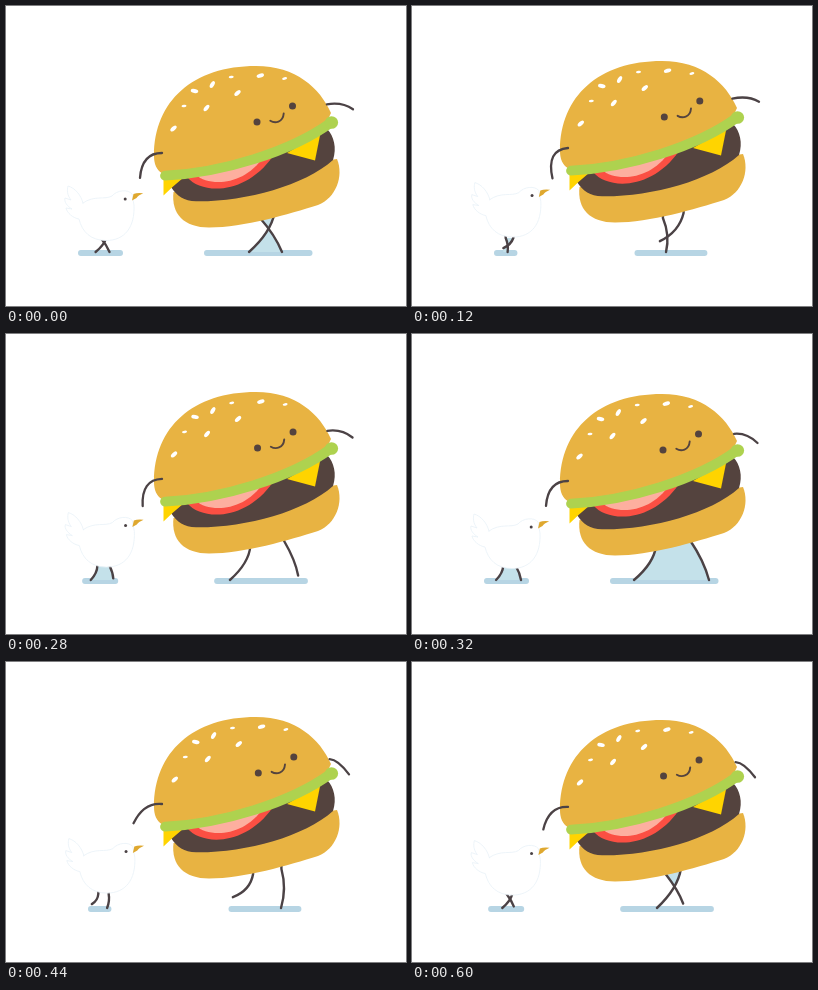
Write an HTML page with a canvas that moves like this. It is 400 px wide and 300 px high and loops after 0.64 s.

```html
<!DOCTYPE html>
<html lang="en">
<head>
<meta charset="utf-8">
<title>Burger and bird walking</title>
<style>
  html, body { margin: 0; width: 100%; height: 100%; overflow: hidden; background: #fff; }
  canvas { display: block; width: 400px; height: 300px; }
</style>
</head>
<body>
<canvas id="stage"></canvas>
<script>
const LOOP = 640, STEP = 40, GROUND = 246;
const BUN = '#e8b342', DARK = '#54433e', LINE = '#4b4245', GREEN = '#aed24f',
      CHEESE = '#ffd400', RED = '#fb4f43', PINK = '#fdaf9f',
      SHADOW = '#b7d5e4', TINT = '#c4e1ea';
const { sin, cos, abs, max, min, PI } = Math;

const canvas = document.getElementById('stage');
const ctx = canvas.getContext('2d');
const dpr = window.devicePixelRatio || 1;
canvas.width = 400 * dpr;
canvas.height = 300 * dpr;

// x, y, tilt; flat seeds are the small ones
const seeds = [
  [167.5, 122.5, -42], [178, 100, -8], [188.5, 85, 12],
  [206.3, 78.5, -60], [225.2, 71, -8], [200.5, 102, -50],
  [231.5, 87, -42], [254.3, 69.7, -18], [278.6, 72.5, -10]
];

const angle = t => 2 * PI * t / LOOP;

function fill(d, color) {
  ctx.fillStyle = color;
  ctx.fill(new Path2D(d));
}

function stroke(d, color, width) {
  ctx.strokeStyle = color;
  ctx.lineWidth = width;
  ctx.stroke(new Path2D(d));
}

function oval(x, y, rx, ry, color, tilt = 0) {
  ctx.beginPath();
  ctx.ellipse(x, y, rx, ry, tilt * PI / 180, 0, 7);
  ctx.fillStyle = color;
  ctx.fill();
}

function shadow(x1, x2) {
  ctx.beginPath();
  ctx.roundRect(x1, 244, x2 - x1, 5.9, 2.9);
  ctx.fillStyle = SHADOW;
  ctx.fill();
}

function shifted(x, y, draw) {
  ctx.save();
  ctx.translate(x, y);
  draw();
  ctx.restore();
}

// One leg of the walk cycle; the foot lifts during the second half turn
function makeLeg(a, hipX, hipY, footX, scale) {
  const raise = max(0, -sin(a));
  const hip = [hipX + 5 * scale * cos(a), hipY];
  const foot = [
    footX + scale * (27 * cos(a) + 5 * cos(2 * a) + 3.5 * sin(a)),
    GROUND - 11.7 * scale * raise
  ];
  const knee = [
    (hip[0] + foot[0]) / 2 + scale * (6.5 - 2.5 * cos(a)),
    (hip[1] + foot[1]) / 2 + scale * 5 * raise
  ];
  return { hip, knee, foot };
}

function drawLegs(a, b, floor) {
  if (floor) {
    ctx.save();
    ctx.beginPath();
    ctx.rect(0, 0, 400, floor);
    ctx.clip();
    fill(`M${a.hip}Q${a.knee} ${a.foot}V${GROUND}H${b.foot[0]}` +
      `L${b.foot}Q${b.knee} ${b.hip}Z`, TINT);
    ctx.restore();
  }
  for (const { hip, knee, foot } of [a, b]) {
    stroke(`M${hip[0]} ${hip[1] - 4}L${hip}Q${knee} ${foot}`, LINE, 2.4);
  }
}

function drawBird() {
  const body = 'M77 197C88 189 99 194 106 190C111 184 122 183 126 188L128 199' +
    'C129 221 119 234.5 100 234.5C85 234.5 76 226 73 213' +
    'C67 212 61 207 60 202L66 203C61 200 58 196 59 192L65 194' +
    'C61 189 61 184 62 180C69 182 75 189 77 197Z';
  fill(body, '#fff');
  stroke(body, '#e9f2f8', 0.8);
  oval(119.2, 193, 1.5, 1.5, LINE);
  fill('M126 194.5L127.5 188Q131 186.5 137.2 187.2Q132 189.5 130.5 192Z', '#dfa82f');
}

function drawBurger(t, drift) {
  fill('M167.5 186C165 208 178 221.5 203 221.5C238 221.5 283 208 312 199' +
    'C330 192 338 170 331 153L250 165Z', BUN);
  fill('M165 181C171 190 178 195 190 195.3C238 196 298 180 327 154' +
    'C331 142 328 130 321 123L290 138L178 170Z', DARK);
  fill('M181 171C196 189 240 189 267 150Z', RED);
  fill('M190 169C203 180.5 238 180.5 258 150Z', PINK);
  fill('M281 147L309 154.5L314.5 127Z', CHEESE);
  fill('M157.5 172V189.5Q166 181 177 172Z', CHEESE);

  fill('M148 150C148 95 187 60 250 60C290 60 314 82 325 107' +
    'C316 128 285 146 250 152C215 162 185 167 158 168C150 165 148 157 148 150Z', BUN);
  stroke('M159 169.7C215 167 285 146 325 116.5', GREEN, 9.8);
  oval(325.5, 116.5, 6.6, 6.3, GREEN);

  shifted(drift, 0, () => {
    for (const [x, y, tilt] of seeds) {
      const r = abs(tilt) > 10 ? 3.8 : 2.5;
      oval(x, y, r, r * 0.52, '#fff', tilt);
    }
    oval(251, 116, 3.5, 3.5, DARK);
    oval(286.5, 100, 3.5, 3.5, DARK);
    stroke('M264.3 114.8C269 117.5 277 116.5 277.7 107.5', DARK, 1.9);
  });

  const swing = sin(angle(t));
  stroke(`M156 147Q${136 - 2 * swing} ${147 + 2 * swing} ` +
    `${134 + 7 * swing} ${171.8 + 6 * swing}`, LINE, 2.3);

  // The right arm rests at both ends of its swing
  const drop = 5 - 9 * sin(angle(min(max(t, 70), 520)));
  const tipX = 347 - 0.3 * max(0, drop);
  stroke(`M${321 + 0.2 * drop} ${98.5 + 0.27 * drop}` +
    `Q${tipX - 11} ${96 + 0.5 * drop} ${tipX} ${104 + drop}`, LINE, 2.3);
}

function draw(t) {
  const a = angle(t), b = a + PI;
  const lift = abs(sin(a));

  ctx.setTransform(dpr, 0, 0, dpr, 0, 0);
  ctx.lineCap = ctx.lineJoin = 'round';
  ctx.fillStyle = '#fff';
  ctx.fillRect(0, 0, 400, 300);

  // A pale tint fills the gap between the legs while they enclose it
  const crossing = t >= LOOP - STEP;
  const closed = t % (LOOP / 2) <= STEP;
  const floor = crossing ? 226 : closed ? GROUND : 0;
  const birdFloor = t >= 120 && t <= 360 ? GROUND : 0;

  shadow(72 + 10.8 * lift, 117 - 12.5 * lift);
  drawLegs(makeLeg(a, 93, 232, 92, 0.36), makeLeg(b, 102, 232, 97.5, 0.36), birdFloor);
  shifted(0.9 * lift, -3.7 * lift, drawBird);

  shadow(198 + 26.5 * lift, 306.5 - 12 * lift);
  drawLegs(makeLeg(a, 249, 212, 244, 1), makeLeg(b, 273.5, 207, 265, 1), floor);
  shifted(0, -5.4 * lift, () => drawBurger(t, 1.4 * lift));
}

const start = performance.now();
function tick() {
  const t = (performance.now() - start) % LOOP;
  draw(Math.floor(t / STEP) * STEP);
  requestAnimationFrame(tick);
}
tick();
</script>
</body>
</html>
```
